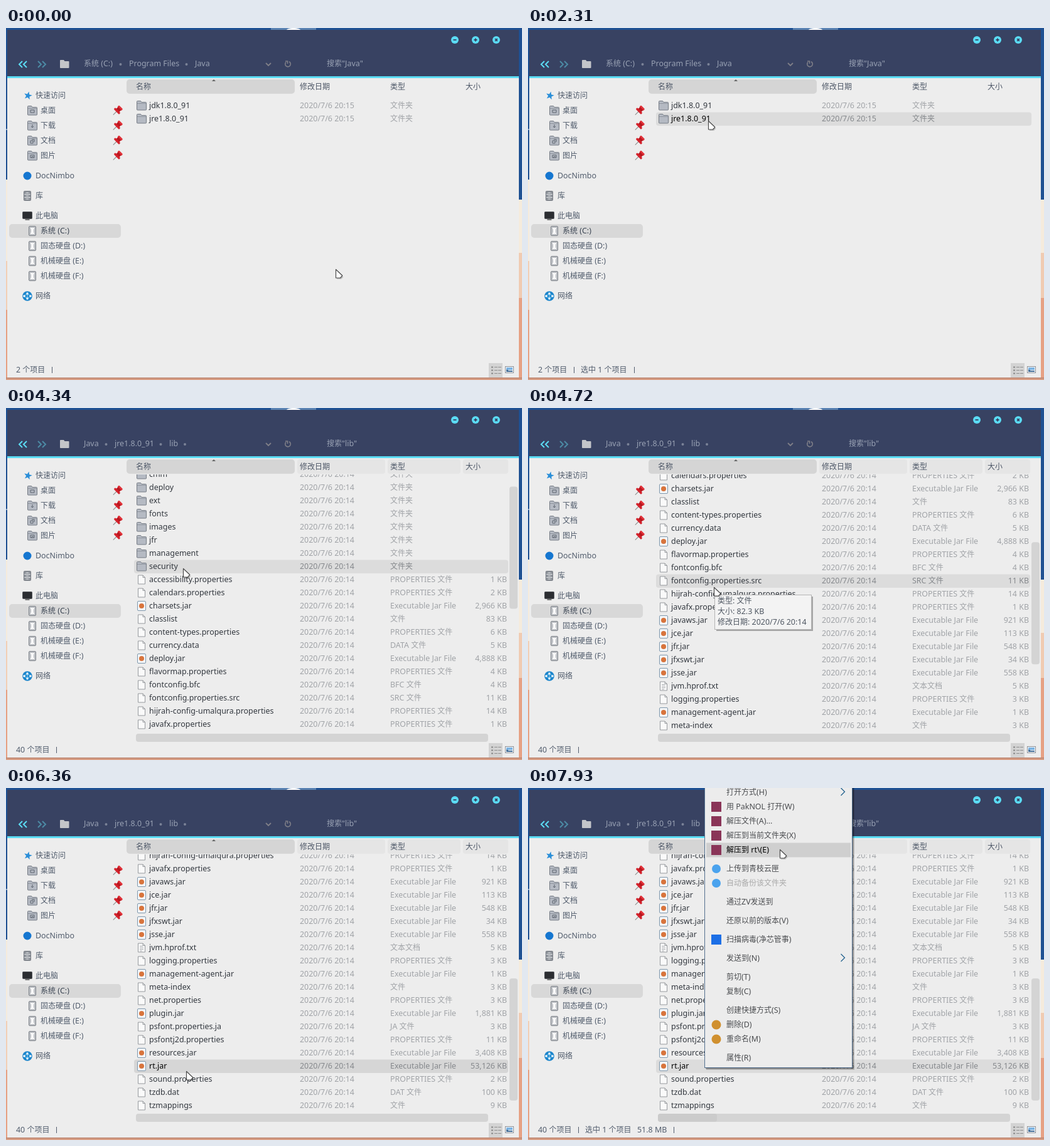
An HTML page for the animation above (8000 ms loop, 822 by 562 pixels).

```html
<!DOCTYPE html>
<html lang="zh-CN">
<head>
<meta charset="utf-8">
<title>File manager</title>
<style>
html, body { margin: 0; width: 100%; height: 100%; overflow: hidden; background: #ededed; }
svg { display: block; width: 822px; height: 562px; }
text { font: 12.45px "Noto Sans", "Noto Sans CJK SC", "Noto Sans CJK", sans-serif; white-space: pre; }
</style>
</head>
<body>
<svg viewBox="0 0 822 562">
  <defs>
    <clipPath id="listClip"><rect x="192" y="106" width="610" height="412"/></clipPath>
    <linearGradient id="sand" x1="0" y1="0" x2="0" y2="1">
      <stop offset="0" stop-color="#b98470"/><stop offset="1" stop-color="#e3a68a"/>
    </linearGradient>
  </defs>
  <g id="base"></g>
  <g id="live"></g>
</svg>
<script>
const LOOP = 8000, ROW = 21, TOP = 124;
const $ = id => document.getElementById(id);

// ---- drawing helpers ----
const rect = (x, y, w, h, fill, more = '') =>
  `<rect x="${x}" y="${y}" width="${w}" height="${h}" fill="${fill}" ${more}/>`;
const circle = (x, y, r, fill, more = '') =>
  `<circle cx="${x}" cy="${y}" r="${r}" fill="${fill}" ${more}/>`;
const path = (d, fill, stroke = 'none', more = '') =>
  `<path d="${d}" fill="${fill}" stroke="${stroke}" ${more}/>`;
const group = (x, y, body, more = '') =>
  `<g transform="translate(${x} ${y})" ${more}>${body}</g>`;
const text = (x, y, s, fill, more = '') =>
  `<text x="${x}" y="${y + 4}" fill="${fill}" ${more}>` +
  s.replace(/[\u3000-\u9fff]+/g, m => `<tspan font-size="12">${m}</tspan>`) + '</text>';

// ---- icons, centred on 0,0 ----
const folder = path('M-7.5-6.5q0-1 1-1h5l1.5 2h6.5q1 0 1 1v10.5q0 1-1 1h-13q-1 0-1-1z', '#b5bac3', '#757b84') +
  path('M-7-3.5H7', 'none', '#8f959e');
const sheet = path('M-5.5-7h7.5l3.5 3.5v10.5h-11z', '#fafafa', '#96999d') +
  path('M2-7v3.5h3.5', 'none', '#96999d');
const icons = {
  dir: folder,
  file: sheet,
  txt: sheet + path('M-3-2.5h5M-3 0h6M-3 2.5h6M-3 5h4', 'none', '#a9acb0'),
  jar: rect(-6.5, -7.5, 13, 15, '#f4f6f8', 'rx="1.5" stroke="#7f98ad"') + circle(0, 0, 4, '#d8743c'),
  html: circle(0, 0, 7.5, '#3f92d8')
};
const drive = rect(-5.5, -7.5, 11, 15, '#c3c6ca', 'rx="1.5" stroke="#7b8087"') +
  path('M-3.5-5.5h7v2l-1 1v5l1 1v2h-7v-2l1-1v-5l-1-1z', '#fafafa', '#9a9ea4', 'stroke-width=".6"');
const pin = '<g transform="rotate(45)">' + path('M0 2V9.5', 'none', '#888') +
  rect(-4.5, -8, 9, 4, '#e0323a', 'rx="1.5"') + rect(-3.5, -5, 7, 5, '#b81820') +
  rect(-6, -1, 12, 3.5, '#d4212b', 'rx="1.5"') + '</g>';

// ---- fixed parts ----
function drawBase() {
  const cyan = '#5bdcf4', navy = '#384262', side = '#525d6d';
  let s = rect(0, 0, 822, 562, '#1f5193') + rect(422, 0, 72, 3, '#5b83b3') +
    '<ellipse cx="458" cy="3" rx="11" ry="3" fill="#fff"/>' +
    rect(0, 161, 2, 2, '#8fa9cb') + rect(0, 242, 3, 130, '#f5ebdc') + rect(0, 372, 3, 78, '#f2cfb6') +
    rect(0, 450, 3, 112, '#e6a184') + rect(817, 274, 5, 85, '#f5ebdc') +
    rect(817, 359, 5, 72, '#f0cbb2') + rect(817, 431, 5, 131, '#e6a184') +
    rect(0, 558, 822, 4, 'url(#sand)') +
    rect(2, 3, 815, 555, '#ededed') + rect(2, 3, 815, 74, navy) + rect(2, 77, 815, 3, cyan);
  const marks = ['M-2.5 0h5', 'M-2.5 0h5M0-2.5v5', 'M-1.8-1.8l3.6 3.6M1.8-1.8l-3.6 3.6'];
  marks.forEach((d, i) => s += group(715 + 33 * i, 19,
    circle(0, 0, 6, cyan) + path(d, 'none', navy, 'stroke-width="1.8"')));
  s += path('M26 53l-5 5 5 5M33 53l-5 5 5 5', 'none', cyan, 'stroke-width="2"') +
    path('M51 53l5 5-5 5M58 53l5 5-5 5', 'none', '#4d8ba5', 'stroke-width="2"') +
    path('M86 52q0-1 1-1h5l1.5 2h6q1 0 1 1v9q0 1-1 1h-12.5q-1 0-1-1z', '#c3c5c9') +
    path('M414 56l4 4 4-4', 'none', '#7f7f88', 'stroke-width="1.8"') +
    path('M446 54.5a4.3 4.3 0 1 0 5-.8M445 53h3.5v4', 'none', '#7f7f88', 'stroke-width="1.6"');

  s += rect(5, 313, 178, 22, '#d8d8d8', 'rx="5"');
  const star = [...Array(10)].map((_, i) => {
    const a = i * Math.PI / 5 - 1.35, r = i % 2 ? 2.8 : 6.8;
    return (Math.cos(a) * r).toFixed(1) + ' ' + (Math.sin(a) * r).toFixed(1);
  }).join('L');
  s += group(35, 108, path('M' + star + 'z', '#2b8fd8')) + text(47, 108, '快速访问', side);
  const glyphs = ['M-3-1h6v4h-6z', 'M0-2v5M-2 1l2 2 2-2', 'M-3 0h4v4h-4zM-1-2h4v4', 'M-3-1h6v4h-6zM-2 3l2-2 2 1'];
  ['桌面', '下载', '文档', '图片'].forEach((name, i) => {
    const y = 132 + 24 * i;
    s += group(42, y, folder + path(glyphs[i], 'none', '#5d646f')) +
      text(55, y, name, side) + group(177.5, y, pin);
  });
  s += circle(34, 236, 6.5, '#1576d0') + text(47, 236, 'DocNimbo', side) +
    rect(28.5, 260.5, 11, 15, '#8f949b', 'rx="1" stroke="#72777f"') +
    path('M29 265.5h10M29 270.5h10M32 263h4M32 268h4M32 273h4', 'none', '#dfe1e4') +
    text(47, 268, '库', side) +
    rect(26.5, 293.5, 15, 11, '#2b2d31', 'rx="1" stroke="#54575c"') +
    path('M30.5 306h7', 'none', '#777', 'stroke-width="2"') + text(47, 300, '此电脑', side);
  ['系统 (C:)', '固态硬盘 (D:)', '机械硬盘 (E:)', '机械硬盘 (F:)'].forEach((name, i) =>
    s += group(42, 324 + 24 * i, drive) + text(55, 324 + 24 * i, name, i ? side : '#3c4654'));
  s += circle(34, 428, 7.8, '#1d86cc') + path('M29 428l5-4 5 4-5 4zM34 424v8', 'none', '#8fd4f5') +
    circle(34, 424, 1.7, '#fff') + circle(29, 428, 1.7, '#fff') + circle(39, 428, 1.7, '#fff') +
    circle(34, 432, 1.7, '#fff') + text(47, 428, '网络', side);

  s += rect(769, 535, 22, 23, '#d3d3d3') +
    path('M773 541.5h3M773 546.5h3M773 551.5h3', 'none', '#8a8a8a', 'stroke-width="2"') +
    path('M778 541.5h5M784 541.5h5M778 546.5h5M784 546.5h5M778 551.5h5M784 551.5h5', 'none', '#8f8f8f') +
    rect(795.5, 540.5, 13, 10, '#fff', 'stroke="#8a8f96"') + rect(797, 542, 10, 4, '#7db4e2') +
    path('M797 549v-4l4 2h6v2z', '#3f6a94');
  $('base').innerHTML = s;
}

// ---- folders: "name:size", no size means a folder ----
const kinds = { dir: '文件夹', jar: 'Executable Jar File', txt: '文本文档', html: 'ZVSurfing HT...', file: '文件' };
const parse = s => s.trim().split(/\s+/).map(entry => {
  const [name, size] = entry.split(':');
  const ext = name.split('.').pop();
  if (!size) return { name, kind: 'dir', type: kinds.dir };
  if (icons[ext]) return { name: name.replace('....txt', '...'), size, kind: ext, type: kinds[ext] };
  return { name, size, kind: 'file', type: ext === name ? kinds.file : ext.toUpperCase() + ' 文件' };
});
const homeList = parse('jdk1.8.0_91 jre1.8.0_91');
const jreList = parse(`bin lib COPYRIGHT:4 LICENSE:1 README.txt:1 release:1
  THIRDPARTYLICENSEREADME.txt:173 THIRDPARTYLICENSEREADME-JAVAF....txt:108 Welcome.html:1`);
const libList = parse(`amd64 applet cmm deploy ext fonts images jfr management security
  accessibility.properties:1 calendars.properties:2 charsets.jar:2,966 classlist:83
  content-types.properties:6 currency.data:5 deploy.jar:4,888 flavormap.properties:4
  fontconfig.bfc:4 fontconfig.properties.src:11 hijrah-config-umalqura.properties:14
  javafx.properties:1 javaws.jar:921 jce.jar:113 jfr.jar:548 jfxswt.jar:34 jsse.jar:558
  jvm.hprof.txt:5 logging.properties:3 management-agent.jar:1 meta-index:3 net.properties:3
  plugin.jar:1,881 psfont.properties.ja:3 psfontj2d.properties:11 resources.jar:3,408
  rt.jar:53,126 sound.properties:2 tzdb.dat:100 tzmappings:9`);

// ---- motion: start, end, steps, x, y, scroll ----
const moves = [
  [580, 700, 2, 493, 363, 0], [1140, 1380, 3, 410, 241, 0], [1530, 1650, 2, 342, 217, 0],
  [1800, 2160, 4, 287, 148, 0], [2840, 2960, 2, 242, 147, 0], [3110, 3110, 1, 239, 146, 0],
  [4060, 4180, 2, 268, 225, 0], [4340, 4460, 2, 296, 286, 120], [4600, 4720, 2, 296, 286, 247],
  [4870, 5230, 4, 303, 327, 436], [5380, 5380, 1, 313, 383, 436], [5500, 5620, 2, 318, 467, 436],
  [5770, 5770, 1, 310, 488, 436], [5900, 5900, 1, 287, 452, 436], [6510, 6750, 3, 280, 448, 436],
  [7530, 7660, 2, 370, 211, 436], [7810, 7930, 2, 401, 98, 436]
];
function pose(t) {
  let p = [525, 385, 0];
  for (const [start, end, n, ...to] of moves) {
    if (t < start) break;
    const gap = (end - start) / (n - 1) || 1;
    const k = Math.min(n, Math.floor((t - start) / gap) + 1) / n;
    p = p.map((v, i) => Math.round(v + (to[i] - v) * k));
  }
  return p;
}
// value of the last [time, value] pair reached
const at = (t, steps) => steps.reduce((v, s) => t >= s[0] ? s[1] : v, 0);

const crumbs = [
  [['系统 (C:)', 124], ['Program Files', 196], ['Java', 301]],
  [['Program Files', 124], ['Java', 228], ['jre1.8.0_91', 277]],
  [['Java', 124], ['jre1.8.0_91', 173], ['lib', 260]]
];
function drawAddress(t) {
  const items = crumbs[at(t, [[2840, 1], [3790, 2]])], ink = '#99a2b4';
  const dot = x => circle(x, 58, 2, '#7b8398');
  let s = text(511, 57, `搜索"${items[2][0]}"`, ink);
  items.forEach(([name, x], i) => s += text(x, 57, name, ink) + (i ? dot(x - 13.5) : ''));
  return s + (t >= 4060 ? dot(285) : '');
}

function drawHeader(scroll) {
  let s = rect(192, 82, 268, 23, '#d5d5d5', 'rx="5"') + path('M328 85l3-3 3 3z', '#666');
  if (scroll) s += rect(464, 82, 140, 23, '#e5e5e5', 'rx="4"') +
    rect(608, 82, 116, 23, '#e5e5e5', 'rx="4"') + rect(728, 82, 72, 23, '#e5e5e5', 'rx="4"');
  const names = { 207: '名称', 468: '修改日期', 612: '类型', 732: '大小' };
  for (const x in names) s += text(x, 94, names[x], '#4c5666');
  return s;
}

function drawList(t, list, sel, hover, scroll) {
  const bars = t >= 3790, date = '2020/7/6 20:' + (list === homeList ? 15 : 14);
  let s = '';
  list.forEach((f, i) => {
    const y = TOP + ROW * i - scroll;
    if (y < 90 || y > 530) return;
    const lit = i === sel || i === hover, dim = lit ? '#85888c' : '#a0a3a7';
    if (lit) s += rect(204, y - 10.5, (bars ? 800 : 802) - 204, ROW + .5,
      i === sel && i === hover && t >= 3260 ? '#d6d6d6' : '#dcdcdc', 'rx="4"');
    s += group(216, y, icons[f.kind]) + text(228, y, f.name, i === sel ? '#000' : '#33383f') +
      text(468, y, date, dim) + text(612, y, f.type, dim);
    if (f.size) s += text(798, y, f.size + ' KB', dim, 'text-anchor="end"');
  });
  s = `<g clip-path="url(#listClip)">${s}</g>`;
  if (bars) s += rect(802, 97 + scroll * .475, 13, 195, '#d4d4d4', 'rx="4"') +
    rect(207, 520, 561, 13, '#d4d4d4', 'rx="4"');
  if (t >= 6510) s += rect(207, 520, 94, 13, '#cbcbcb', 'rx="4"');
  return s;
}

function drawStatus(t, list) {
  const ink = '#525d6d', n = list.length, x = n > 9 ? 7 : 0;
  const bar = px => rect(px, 541, 1, 10, ink);
  let s = text(16, 546, n + ' 个项目', ink) + bar(73 + x);
  if (t >= 6510) s += text(91, 546, '选中 1 个项目', ink) + text(174, 546, '51.8 MB', ink) + bar(232);
  else if (n < 10 && at(t, [[2310, 1], [2960, 0], [3260, 1]])) s += text(84, 546, '选中 1 个项目', ink) + bar(169);
  return s;
}

function drawTip(t) {
  const alpha = at(t, [[4600, .5], [4720, 1], [4870, .5], [4990, 0], [5380, .6], [5500, 1], [5770, .5], [5900, 0]]);
  if (!alpha) return '';
  const late = t >= 5380;
  const lines = ['类型: 文件', '大小: ' + (late ? '2.07' : '82.3') + ' KB', '修改日期: 2020/7/6 20:14'];
  return group(late ? 303 : 297, late ? 342 : 298,
    rect(3, 3, 154, 55, '#000', 'opacity=".3"') +
    rect(.5, .5, 154, 55, '#f3f3f3', 'stroke="#b4b4b4"') +
    lines.map((l, i) => text(5, 10 + 17 * i, l, '#4f5762')).join(''), `opacity="${alpha}"`);
}

const rar = rect(-8, -8, 16, 16, '#8a3558'), cloud = circle(0, 0, 7, '#4ba3ee'),
  guard = rect(-8, -8, 16, 16, '#1c6fe6'), shield = circle(0, 0, 7.5, '#d0902f');
const menu = [
  [7, '打开方式(H)', ''], [30, '用 PakNOL 打开(W)', rar], [53, '解压文件(A)...', rar],
  [76, '解压到当前文件夹(X)', rar], [99, '解压到 rt\\(E)', rar], [129, '上传到青枝云匣', cloud],
  [152, '自动备份该文件夹', cloud], [182, '通过ZV发送到', ''], [212, '还原以前的版本(V)', ''],
  [242, '扫描病毒(净芯管事)', guard], [272, '发送到(N)', ''], [302, '剪切(T)', ''], [325, '复制(C)', ''],
  [355, '创建快捷方式(S)', ''], [378, '删除(D)', shield], [401, '重命名(M)', shield], [431, '属性(R)', '']
];
function drawMenu(t, y) {
  const alpha = at(t, [[7020, .3], [7140, .64], [7260, .88], [7380, 1]]);
  if (!alpha) return '';
  let s = rect(284, -5, 236, 455, '#000', 'opacity=".18"') + rect(283, -5, 235.5, 453.5, '#000', 'opacity=".3"') +
    rect(281.5, -5, 235, 451.5, '#ececec', 'stroke="#54708f"');
  menu.forEach(([my, label, icon], i) => {
    const on = t >= 7530 && Math.abs(my - y) < 12;
    if (on) s += rect(284, my - 11.5, 230, 23, '#cfcfcf');
    s += group(300, my, icon) + text(316, my, label, on ? '#000' : i === 6 ? '#a9a9a9' : '#4b4d50');
  });
  for (const ay of [6, 271]) s += path(`M498.5 ${ay - 6}l6 6-6 6`, 'none', '#24638f', 'stroke-width="1.3"');
  return `<g opacity="${alpha}">${s}</g>`;
}

const pointer = path('M2 3v13h7l3.5-3.5z', '#000', 'none', 'opacity=".2"') +
  path('M.5.5V14H7.5L10.8 10.3z', '#fff', '#4a4a4a', 'stroke-width="1.2" stroke-linejoin="round"');

let last = '';
function render(t) {
  const [x, y, scroll] = pose(t);
  const list = t < 2960 ? homeList : t < 3910 ? jreList : libList;
  const sel = at(t, [[0, -1], [2310, 1], [2960, -1], [3260, 1], [3910, -1], [6360, 36]]);
  const hover = t < 6900 && y > 113 ? Math.floor((y - 113.5 + scroll) / ROW) : -1;
  const s = drawAddress(t) + drawList(t, list, sel, hover, scroll) + drawHeader(scroll) +
    drawStatus(t, list) + drawTip(t) + drawMenu(t, y) + group(x, y, pointer);
  if (s !== last) $('live').innerHTML = last = s;
}
function tick() {
  render(performance.now() % LOOP);
  requestAnimationFrame(tick);
}
drawBase();
tick();
</script>
</body>
</html>
```
